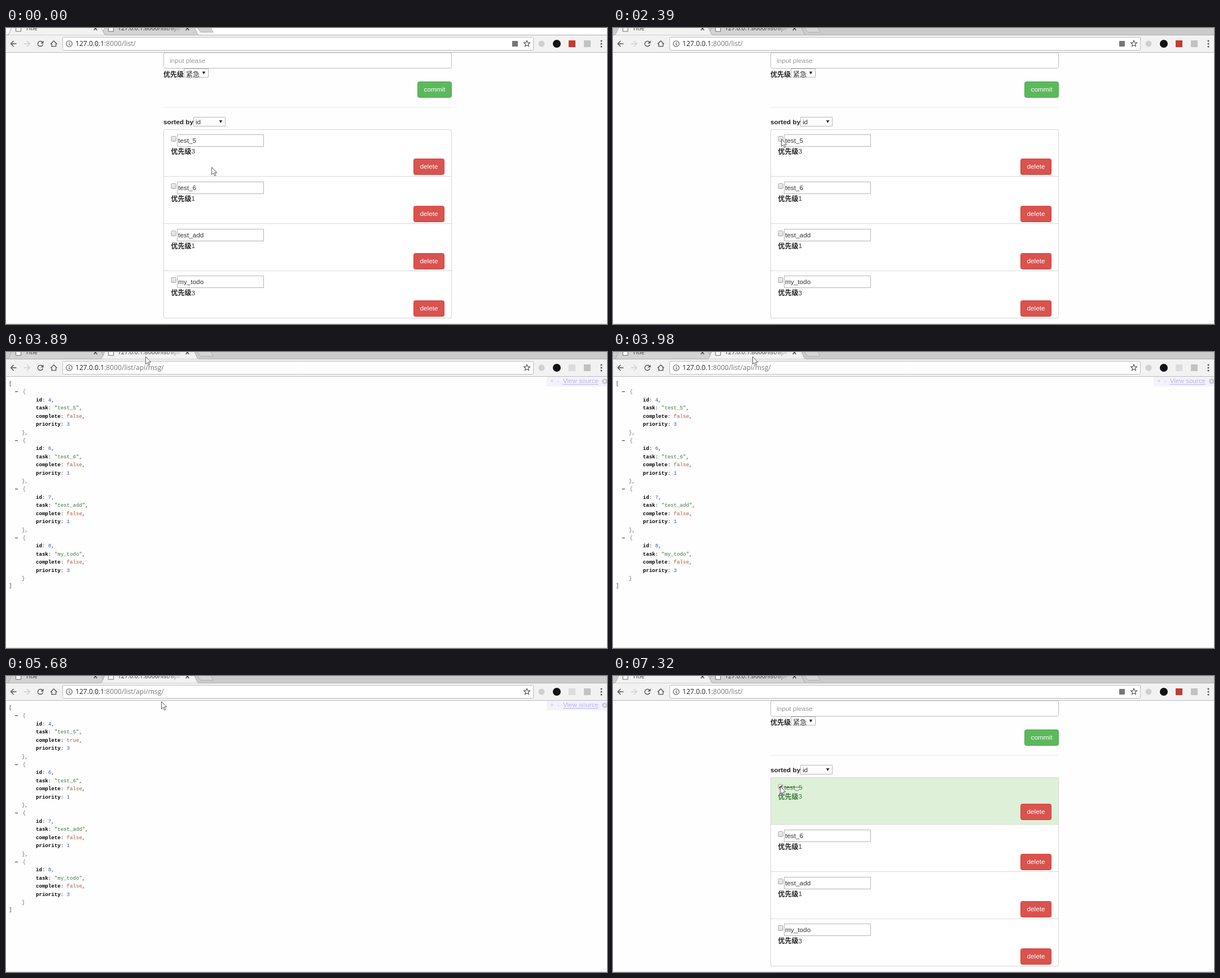
Animation, 1065 px wide and 526 px high, one loop 8000 ms. Source, as an HTML page with a canvas:

```html
<!DOCTYPE html>
<html lang="zh">
<head>
<meta charset="utf-8">
<title>Todo list</title>
<style>
html, body { margin: 0; width: 100%; height: 100%; overflow: hidden; background: #fefefe; }
canvas { display: block; }
</style>
</head>
<body>
<canvas id="stage" width="1065" height="526"></canvas>
<script>
const ctx = document.getElementById('stage').getContext('2d');
const LOOP = 8000;
const CJK = '"Noto Sans CJK SC", "Noto Sans CJK", sans-serif';
const ARIAL = '11.8px "Liberation Sans", Arial, sans-serif';
const HAN = '12px ' + CJK;
const UI = '"Open Sans", "Noto Sans", sans-serif';
const MONO = '9.1px "Liberation Mono", monospace';

const TIME = { focus: 2390, check: 2480, toApi: 3740, menu: 4580, hover: 4820, reload: 5370, loaded: 5600, toList: 6620 };
const TASKS = [
  { id: 4, name: 'test_5', priority: 3 },
  { id: 6, name: 'test_6', priority: 1 },
  { id: 7, name: 'test_add', priority: 1 },
  { id: 8, name: 'my_todo', priority: 3 }
];
const ROW = 83.8;

// Each move: start, end, number of steps, then [progress, x, y] points.
const MOVES = [
  { from: 1140, to: 1380, steps: 4, path: [[0, 364, 247], [1, 291, 194]] },
  { from: 1620, to: 1870, steps: 4, path: [[0, 291, 194], [1, 298, 197]] },
  { from: 2860, to: 3650, steps: 11, path: [[0, 298, 197], [0.364, 235, 79], [0.65, 204, 3], [1, 247, 8]] },
  { from: 4750, to: 4890, steps: 3, path: [[0, 247, 8], [1, 275, 45]] },
  { from: 5820, to: 6370, steps: 8, path: [[0, 275, 45], [0.7, 37, 2], [1, 123, 6]] },
  { from: 6770, to: 7320, steps: 8, path: [[0, 123, 6], [1, 296, 196]] }
];

function rect(x, y, w, h, fill) {
  ctx.fillStyle = fill;
  ctx.fillRect(x, y, w, h);
}

function box(x, y, w, h, r, fill, stroke) {
  ctx.beginPath();
  ctx.roundRect(x + 0.5, y + 0.5, w - 1, h - 1, r);
  if (fill) { ctx.fillStyle = fill; ctx.fill(); }
  ctx.lineWidth = 1;
  ctx.strokeStyle = stroke;
  ctx.stroke();
}

function poly(points, { fill, stroke, width = 1, close = false }) {
  ctx.beginPath();
  points.forEach(([x, y]) => ctx.lineTo(x, y));
  if (close) ctx.closePath();
  if (fill) { ctx.fillStyle = fill; ctx.fill(); }
  if (stroke) { ctx.strokeStyle = stroke; ctx.lineWidth = width; ctx.stroke(); }
}

function arc(x, y, r, color, width = 0, a = 0, b = Math.PI * 2) {
  ctx.beginPath();
  ctx.arc(x, y, r, a, b);
  if (width) { ctx.strokeStyle = color; ctx.lineWidth = width; ctx.stroke(); }
  else { ctx.fillStyle = color; ctx.fill(); }
}

function text(str, x, y, font, color, align = 'left') {
  ctx.font = font;
  ctx.fillStyle = color;
  ctx.textAlign = align;
  ctx.fillText(str, x, y);
  return x + ctx.measureText(str).width;
}

function cross(x, y, r, color, width) {
  poly([[x - r, y - r], [x + r, y + r]], { stroke: color, width });
  poly([[x + r, y - r], [x - r, y + r]], { stroke: color, width });
}

function fileIcon(x) {
  poly([[x, -4], [x + 6, -4], [x + 9, -1], [x + 9, 6], [x, 6]], { fill: '#fff', stroke: '#6a6a6a', close: true });
}

function tabShape(x1, x2, active) {
  poly([[x1, 12.5], [x1 + 3, 10.5], [x1 + 9, -3], [x2 - 9, -3], [x2 - 3, 10.5], [x2, 12.5]],
    { fill: active ? '#f2f2f2' : '#d3d3d3', stroke: '#a9a9a9' });
}

function drawTabs(api, focused) {
  rect(0, 0, 1065, 13, focused ? '#cbcbcb' : '#fff');
  poly([[338, -2], [345, 7.5], [367, 7.5], [362, -2]], { fill: focused ? '#d6d6d6' : '#d0d0d0', stroke: '#b0b0b0' });
  tabShape(...(api ? [2, 177] : [167, 342]), false);
  rect(0, 12, 1065, 1, '#adadad');
  tabShape(...(api ? [167, 342] : [2, 177]), true);
  fileIcon(17.5);
  fileIcon(181.5);
  text('Title', 34.5, 4, '10.8px ' + UI, '#333');
  const fade = ctx.createLinearGradient(285, 0, 312, 0);
  fade.addColorStop(0, '#333');
  fade.addColorStop(1, 'rgba(51,51,51,.1)');
  text('127.0.0.1:8000/list/api/', 198, 4, '10.6px ' + UI, fade);
  cross(158.5, 1, 3, '#444', 1.4);
  cross(321.5, 1, 3, '#444', 1.4);
}

function arrowIcon(x, dir, color) {
  poly([[x - 5 * dir, 28], [x + 5 * dir, 28]], { stroke: color, width: 1.5 });
  poly([[x, 23], [x + 5 * dir, 28], [x, 33]], { stroke: color, width: 1.5 });
}

function star(x, y) {
  const points = Array.from({ length: 10 }, (_, i) => {
    const a = -Math.PI / 2 + i * Math.PI / 5, r = i % 2 ? 2.6 : 5.7;
    return [x + r * Math.cos(a), y + r * Math.sin(a)];
  });
  poly(points, { stroke: '#555', width: 1.2, close: true });
}

function drawToolbar(api, loading) {
  rect(0, 13, 1065, 30, '#f2f2f2');
  rect(0, 43, 1065, 1, '#bcbcbc');
  arrowIcon(13.5, -1, '#555');
  arrowIcon(37, 1, '#cfcfcf');
  if (loading) {
    cross(61, 28, 4.5, '#555', 1.6);
  } else {
    arc(61, 28, 4.6, '#555', 1.5, 0.35, Math.PI * 1.75);
    poly([[66.5, 22.5], [66.5, 27.5], [61.5, 27.5]], { fill: '#555', close: true });
  }
  poly([[79, 28.5], [84.7, 23], [90.4, 28.5]], { stroke: '#555', width: 1.4 });
  poly([[81, 27.5], [81, 32.6], [88.5, 32.6], [88.5, 27.5]], { stroke: '#555', width: 1.4 });

  box(100, 16, 835, 24, 2, '#fff', '#bdbdbd');
  arc(112, 28, 5.2, '#555', 1.1);
  rect(111.4, 27, 1.3, 4, '#555');
  rect(111.4, 24.8, 1.3, 1.3, '#555');
  const font = '12.1px ' + UI;
  const end = text('127.0.0.1', 123, 32, font, '#222');
  text(api ? ':8000/list/api/msg/' : ':8000/list/', end, 32, font, '#777');

  if (!api) rect(897, 23, 10, 10, '#777');
  star(923, 28);
  arc(949, 28, 5.5, '#d0d0d0');
  arc(976, 28, 7, '#111');
  rect(997, 22, 12, 12, api ? '#dcdcdc' : '#c63a34');
  rect(1024, 22, 12, 12, '#c2c2c2');
  [23, 28, 33].forEach(y => arc(1055, y, 1.5, '#555'));
}

function button(label, x, y, w, fill, stroke) {
  box(x, y, w, 29, 3, fill, stroke);
  text(label, x + w / 2, y + 18, ARIAL, '#fff', 'center');
}

function select(x, y, w, h, label, font, baseline) {
  box(x, y, w, h, 0, '#fff', '#b5b5b5');
  text(label, x + 4, baseline, font, '#333');
  const ax = x + w - 8.5, ay = y + h / 2;
  poly([[ax - 2.8, ay - 2.5], [ax + 2.8, ay - 2.5], [ax, ay + 2.5]], { fill: '#222', close: true });
}

function checkbox(x, y, checked) {
  const shade = ctx.createLinearGradient(0, y, 0, y + 10);
  shade.addColorStop(0, '#f2f2f2');
  shade.addColorStop(1, '#dadada');
  box(x, y, 9, 10, 1.5, shade, '#a3a3a3');
  if (checked) poly([[x + 2, y + 5], [x + 3.8, y + 7.2], [x + 7.2, y + 2.4]], { stroke: '#333', width: 1.7 });
}

function drawTask(task, i, done) {
  const at = dy => Math.round(180 + i * ROW + dy);
  const up = done ? 5 : 0;
  const color = done ? '#3c763d' : '#333';
  if (done) rect(280, at(1), 509, 83, '#dff0d8');
  checkbox(292.5, at(12), done);
  if (done) {
    const end = text(task.name, 303.5, at(22), ARIAL, color);
    rect(303, at(17), end - 303, 1, color);
  } else {
    box(303, at(9), 154, 22, 0, '#fff', '#b3b3b3');
    text(task.name, 305, at(24), ARIAL, '#333');
  }
  const end = text('优先级', 292.5, at(44 - up), 'bold ' + HAN, done ? color : '#222');
  text(task.priority, end, at(43.4 - up), ARIAL, color);
  button('delete', 722, at(52.4 - up), 55, '#d9534f', '#d43f3a');
}

function drawList(checked) {
  box(279, 43.5, 511, 28.5, 3, '#fff', '#bbb');
  text('input please', 290, 62, ARIAL, '#999');
  text('优先级', 279, 87, 'bold ' + HAN, '#222');
  select(315, 72, 44, 16, '紧急', HAN, 87);
  button('commit', 729, 95, 61, '#5cb85c', '#4cae4c');
  rect(279, 140.5, 511, 1, '#e8e8e8');
  text('sorted by', 279, 171, 'bold ' + ARIAL, '#222');
  select(332, 158, 57, 17, 'id', ARIAL, 171);
  box(279, 180, 511, 336, 3, '#fff', '#d6d6d6');
  TASKS.forEach((task, i) => drawTask(task, i, checked && i === 0));
  for (let i = 1; i < 4; i++) rect(279, 179.5 + i * ROW, 511, 1, '#d6d6d6');
  box(279, 180, 511, 336, 3, null, '#d6d6d6');
}

function field(key, value, y, color, comma = ',') {
  let x = text(key, 53, y, 'bold ' + MONO, '#000');
  x = text(': ', x, y, MONO, '#333');
  x = text(value, x, y, MONO, color);
  text(comma, x, y, MONO, '#333');
}

function drawJson(complete, widget) {
  text('[', 5, 59, MONO, '#333');
  TASKS.forEach((task, i) => {
    const y = 73.4 + i * 86.4, row = n => Math.round(y + n * 14.5);
    rect(16, row(0) - 3, 5, 1, '#333');
    text('{', 29.5, row(0), MONO, '#777');
    field('id', task.id, row(1), '#2952d0');
    field('task', `"${task.name}"`, row(2), '#36753a');
    field('complete', complete && i === 0 ? 'true' : 'false', row(3), '#b0553f');
    field('priority', task.priority, row(4), '#2952d0', '');
    text(i < 3 ? '},' : '}', 28, row(5), MONO, '#666');
  });
  text(']', 5, 418, MONO, '#333');
  if (!widget) return;
  rect(958, 44, 107, 17, '#f3f2fc');
  const font = '11.6px "Liberation Sans", Arial, sans-serif';
  text('+', 964, 55, font, '#c5c3d4');
  text('-', 977, 55, font, '#c5c3d4');
  const end = text('View source', 987, 55, font, '#bab2f5');
  rect(987, 57, end - 987, 1, '#bab2f5');
  arc(1061, 52, 3, '#c6c6cc', 2.2);
  for (let a = 0; a < 8; a++) {
    arc(1061 + 4.4 * Math.cos(a * Math.PI / 4), 52 + 4.4 * Math.sin(a * Math.PI / 4), 0.9, '#c6c6cc');
  }
}

const MENU = [
  [20.5, '打开新的标签页', 'Ctrl+T'],
  [50.5, '重新加载', 'Ctrl+R'],
  [71, '复制'],
  [91.5, '固定标签页'],
  [112, '将单个网站静音'],
  [141, '关闭标签页', 'Ctrl+W'],
  [161.5, '关闭其他标签页'],
  [182, '关闭右侧标签页'],
  [211.5, '重新打开关闭的标签页(E)', 'Ctrl+Shift+T'],
  [232, '为所有标签页添加书签...', 'Ctrl+Shift+D']
];

function drawMenu(hover) {
  rect(249, 10, 243.5, 235.5, '#a0a0a0');
  box(247, 8, 244, 236, 0, '#fff', '#c4c4c4');
  [35, 125, 195].forEach(y => rect(248, y, 242, 1, '#e9e9e9'));
  if (hover) rect(248, 40, 242, 20, '#ebebeb');
  MENU.forEach(([y, label, keys], i) => {
    text(label, 270, y + 3.8, '10.2px ' + CJK, i === 7 ? '#a3a3a3' : '#222');
    if (keys) text(keys, 464.5, y + 3.8, '11px ' + UI, hover && i === 1 ? '#222' : '#777', 'right');
  });
}

function cursorAt(t) {
  const move = MOVES.filter(m => t >= m.from).pop();
  if (!move) return MOVES[0].path[0].slice(1);
  const step = Math.floor((t - move.from) / (move.to - move.from) * (move.steps - 1));
  const p = Math.min(1, (step + 1) / move.steps);
  const i = move.path.findIndex(point => point[0] >= p);
  const [p0, x0, y0] = move.path[i - 1], [p1, x1, y1] = move.path[i];
  const k = (p - p0) / (p1 - p0);
  return [x0 + (x1 - x0) * k, y0 + (y1 - y0) * k];
}

function drawCursor([x, y]) {
  const shape = [[0, 0], [0, 13], [3, 10.3], [5.2, 15.2], [7.2, 14.3], [5.2, 9.5], [9.2, 9.5]];
  poly(shape.map(([dx, dy]) => [x + 0.5 + dx, y + 0.5 + dy]), { fill: '#fff', stroke: '#444', width: 0.9, close: true });
}

function draw(t) {
  const api = t >= TIME.toApi && t < TIME.toList;
  const menu = t >= TIME.menu && t < TIME.reload;
  const loading = t >= TIME.reload && t < TIME.loaded;
  rect(0, 0, 1065, 526, '#fefefe');
  if (api) drawJson(t >= TIME.loaded - 80, !loading);
  else drawList(t >= TIME.check);
  rect(0, 525, 1065, 1, '#dcdcdc');
  drawTabs(api, t >= TIME.focus);
  drawToolbar(api, loading);
  if (menu) drawMenu(t >= TIME.hover);
  drawCursor(cursorAt(t));
}

function tick() {
  draw(performance.now() % LOOP);
  requestAnimationFrame(tick);
}
tick();
</script>
</body>
</html>
```
